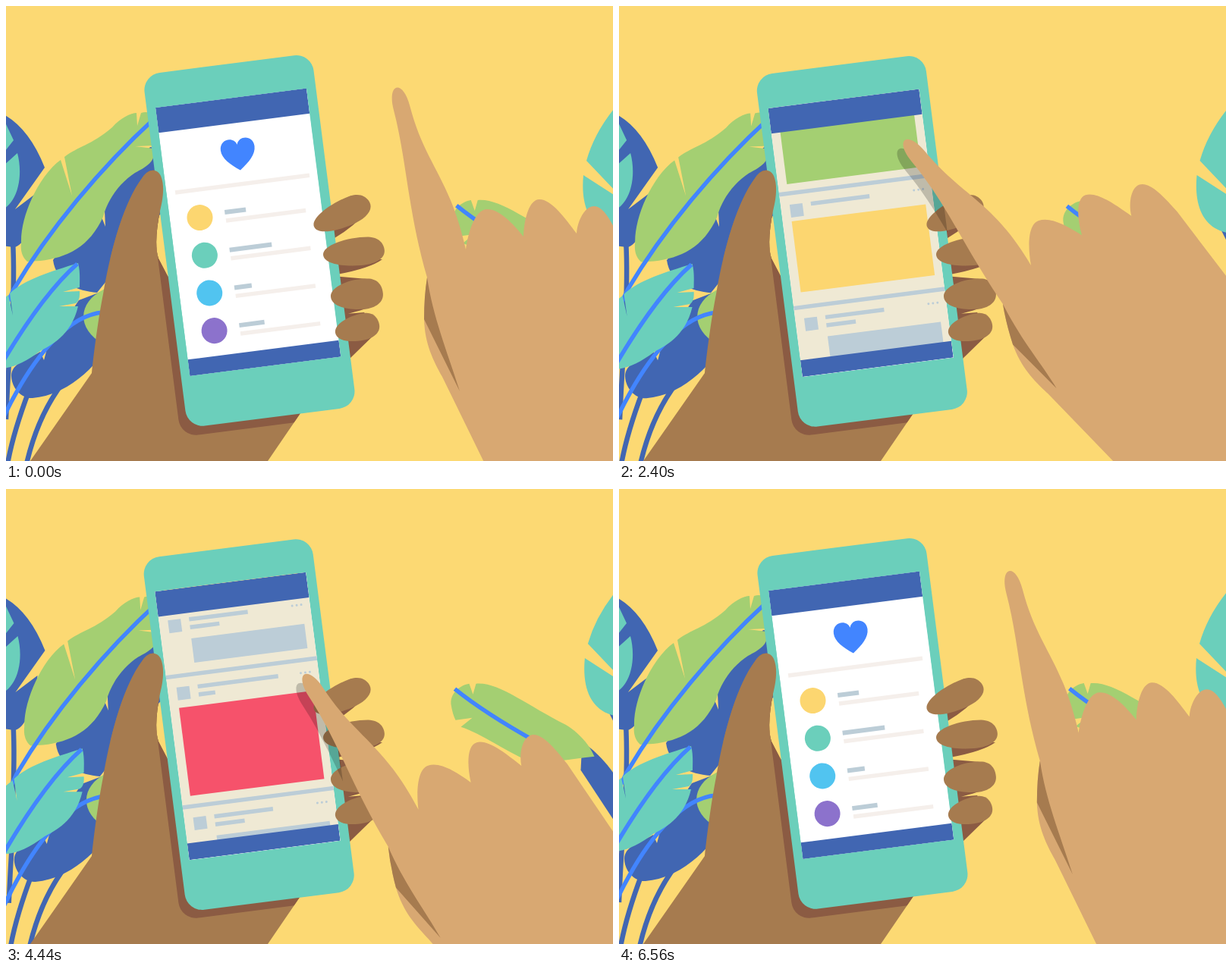
An HTML page that plays this animation: 800 px wide and 600 px high, repeating every 6600 ms.

```html
<!DOCTYPE html>
<html lang="en">
<head>
<meta charset="utf-8">
<title>Scrolling a phone feed</title>
<style>
  html, body { margin: 0; width: 100%; height: 100%; overflow: hidden; background: #fcd973; }
  svg { display: block; width: 100%; height: 100%; }
  .blue { fill: #4166b2; } .teal { fill: #6bcfbb; } .green { fill: #a4cf72; }
  .grey { fill: #bccdd7; } .skin { fill: #a67b4f; } .shade { fill: #8b5b43; }
  .rib, .stem { fill: none; stroke: #4285ff; stroke-width: 5.5; }
  .stem { stroke: #4166b2; stroke-width: 6.5; }
</style>
</head>
<body>
<svg viewBox="0 0 800 600" xmlns="http://www.w3.org/2000/svg">
  <defs>
    <path id="arm" d="M32 600L113 484C116 455 122 410 128 380C140 310 158 255 180 226C188 214 199 214 204 224C210 238 206 258 203 270C198 295 196 318 201 333L213 356L388 537L345 600Z"/>
    <rect id="body" x="-11.7" y="-45" width="224.7" height="469.5" rx="23"/>
    <clipPath id="armClip"><use href="#arm"/></clipPath>
    <clipPath id="thumbClip"><rect y="200" width="230" height="133"/></clipPath>
    <clipPath id="bodyClip"><use href="#body" transform="translate(197 134) rotate(-7.3)"/></clipPath>
    <clipPath id="screenClip"><rect width="200.6" height="357"/></clipPath>
  </defs>
  <rect width="800" height="600" fill="#fcd973"/>

  <g class="sway" data-x="0.5" data-y="0">
    <path class="stem" d="M9 310C11 345 10 380 8 420"/>
    <path class="blue" d="M-5 142Q30 160 51 213L12 268L41 246C39 280 25 318 10 318L-5 316Z"/>
    <path class="teal" d="M-5 145L10 177L-5 196ZM-5 212L15 194C22 220 18 256 -5 269Z"/>
  </g>
  <g class="sway" data-x="4" data-y="1">
    <path class="stem" d="M30 508C18 540 8 570 2 604M74 498C50 530 36 565 27 604M4 470Q2 500 0 545"/>
    <path class="blue" d="M130 375L96 388L80 412L60 430L50 467L45 456C25 468 2 472 8 495C12 510 25 518 35 517C70 514 100 492 122 466L118 404Z"/>
    <path class="green" d="M135 371C97 386 91 420 122 442Z"/>
    <path class="rib" stroke-width="7" d="M128 404C88 407 40 450 -6 548"/>
  </g>
  <g class="sway" data-x="4" data-y="1">
    <path class="blue" d="M190 186L215 190L207 270L120 378C95 376 66 365 62 335L100 280Z"/>
    <path fill="#fcd973" d="M125 276L131 291L130 270Z"/>
  </g>
  <g class="sway" data-x="4.5" data-y="1.7">
    <path class="green" d="M20 312C19 275 45 222 72 203L87 250L77 199C95 185 112 184 140 160C150 148 165 141 172 141L173 158L178 141C187 138 192 142 200 146L196 184L170 185L195 188C198 205 185 212 170 220C150 233 134 255 128 278C110 318 80 332 45 336L28 337C20 330 19 320 20 312Z"/>
    <path class="rib" d="M196 148C124 214 56 296 10 374L-6 408"/>
  </g>
  <g class="sway" data-x="6" data-y="3.5">
    <path class="teal" d="M95 339C98 350 97 362 97 371L75 377L97 376Q98 388 92 392L70 396L95 396C86 435 58 448 45 455C25 470 8 478 -8 478V390L3 381L9 408L5 379C25 360 60 350 95 339Z"/>
    <path class="rib" d="M94 340C60 370 22 424 -10 479"/>
  </g>
  <g class="sway" data-x="-4" data-y="1" data-lag="500">
    <path class="blue" d="M762 332C785 350 795 362 806 378V440L760 370Z"/>
    <path class="green" d="M589 283C588 268 601 258 613 256L618 270L622 256C651 253 690 285 740 310C760 322 772 338 778 352L700 362C660 345 630 322 602 313L617 301L595 304Q591 296 589 283Z"/>
    <path class="rib" d="M594 263C620 284 650 304 700 332"/>
  </g>
  <g class="sway" data-x="2" data-y="0">
    <path class="stem" d="M794 290L808 318"/>
    <path class="teal" d="M806 130Q776 165 765 204L806 247ZM761 223L806 252V300C770 295 757 265 761 223Z"/>
  </g>

  <use href="#arm" class="skin"/>
  <g clip-path="url(#armClip)"><use href="#body" class="shade" transform="translate(188 146) rotate(-7.3)"/></g>
  <path class="shade" d="M420 295L476 270Q460 290 433 306ZM425 335L496 334Q480 346 436 354ZM430 356L476 360L484 395Q470 402 440 408ZM435 407L472 404L491 428L453 465Z"/>

  <g id="phone">
    <use href="#body" class="teal"/>
    <g clip-path="url(#screenClip)">
      <g id="home"><rect width="201" height="357" fill="#fff"/></g>
      <g id="feed">
        <rect width="201" height="357" fill="#efe9d4"/>
        <g id="posts"></g>
        <rect id="veil" width="201" height="357" fill="#efe9d4"/>
        <g id="menu"></g>
      </g>
      <path class="blue" d="M0 0H200.6V33.5H0ZM0 335H200.6V357H0Z"/>
    </g>
  </g>

  <g clip-path="url(#thumbClip)"><use href="#arm" class="skin"/></g>
  <g id="fingers" class="skin"></g>

  <g clip-path="url(#bodyClip)"><path id="shadow"/></g>
  <g id="hand"><path id="palm" fill="#d8a872"/><path id="crease" class="skin"/></g>
</svg>
<script>
const LOOP = 6600;
const $ = id => document.getElementById(id);
const sways = [...document.querySelectorAll('.sway')];
const clamp = v => Math.min(1, Math.max(0, v));

const bar = (x, y, w, h, attrs) => `<rect x="${x}" y="${y - h / 2}" width="${w}" height="${h}" ${attrs}/>`;
const dot = (x, y, r, attrs) => `<circle cx="${x}" cy="${y}" r="${r}" ${attrs}/>`;
const grey = 'class="grey"';

// A holding finger: a teardrop of length l and width w from its tip.
function finger(x, y, angle, l, w) {
  return `<path transform="translate(${x} ${y}) rotate(${angle}) scale(${l} ${w})"
    d="M0 0C0 -.35 .4 -.6 .75 -.55C.95 -.5 1 -.2 1 0C1 .35 .8 .5 .6 .5C.3 .5 0 .35 0 0Z"/>`;
}

function buildHome() {
  const pale = 'fill="#f5efeb"';
  const rows = [['#fcd670', 28], ['#6bcfbb', 56], ['#51c4f0', 23], ['#8c72cc', 33.5]];
  $('home').innerHTML += '<path fill="#4285ff" d="M100.5 96C88 87 78 78 78 67C78 52 97 50 100.500 62C104 50 123 52 123 67C123 78 113 87 100.500 96Z"/>'
    + bar(11.6, 114.4, 178.4, 5.5, pale)
    + rows.map(([color, width], i) => {
      const y = 151.3 + 50.1 * i;
      return dot(39.6, y, 17, `fill="${color}"`) + bar(73, y - 2.8, width, 6, grey) + bar(73.3, y + 8.3, 106, 5.5, pale);
    }).join('');
}

function buildFeed() {
  const posts = [
    { y: 36, lines: [44.5], top: 42.5, h: 16.3 },
    { y: 107.5, pad: 6, lines: [106, 28], top: 43, h: 89, color: '#a4cf72' },
    { y: 258, lines: [78], top: 37, h: 94.3, color: '#fcd670' },
    { y: 409, lines: [78, 39], top: 42.3, h: 32.3 },
    { y: 498.3, lines: [107, 22], top: 42, h: 117, color: '#f6526b' },
    { y: 671, lines: [78, 39], top: 42.3, h: 32.3 }
  ];
  $('posts').innerHTML = posts.map(({ y, pad = 0, lines, top, h, color }, n) => {
    const head = y + pad, left = color ? 12 : 39.7;
    return (n ? bar(0, y, 201, 5.5, grey) : '')
      + bar(12, head + 23.4, 17, 17, grey)
      + lines.map((w, i) => bar(40, head + 17 + 10.6 * i, w, 5.5, grey)).join('')
      + [177, 183, 189].map(x => dot(x, head + 16.7, 1.5, grey)).join('')
      + bar(left, head + top + h / 2, 190 - left, h, color ? `fill="${color}"` : grey);
  }).join('');
}

function buildMenu() {
  let items = '<path fill="#fff" d="M0 145.500H178L183.500 139.500L189 145.500H201V360H0Z"/>';
  for (let y = 167; y < 310; y += 33.6) {
    items += dot(22.8, y, 5.8, 'class="blue"') + bar(44, y, 146, 11.2, 'class="blue"');
  }
  $('menu').innerHTML = items;
}

// Eased progress: gentle start, long settle.
function ease(p) {
  p = clamp(p);
  const curve = (s, a, b) => 3 * (1 - s) * (1 - s) * s * a + 3 * (1 - s) * s * s * b + s * s * s;
  let lo = 0, hi = 1;
  for (let i = 0; i < 18; i++) {
    const mid = (lo + hi) / 2;
    if (curve(mid, 0.33, 0.2) < p) lo = mid; else hi = mid;
  }
  return curve(lo, 0, 1);
}
const ramp = (t, from, to) => ease((t - from) / (to - from));
const swell = (t, from, to) => Math.sin(Math.PI * clamp((t - from) / (to - from)));

function lean(t) {
  const phase = (t + LOOP) % (LOOP / 2) / (LOOP / 4);
  return phase < 1 ? ease(phase) : 1 - ease(phase - 1);
}

// Poses: knuckle position, tilt of the hand, bend of the pointing finger.
const rest = [606, 321, 0, 16];
const tap = [543, 424, 15, 18];
const ready = [587, 353, 10.5, 13];
const swipe = [543, 342, 18, 20];
const touch = [538, 381, 19.8, 10.2];
const raised = [595, 314, 1.5, 23.6];
const curled = [592, 334, 3.3, 32.4];
const gestures = [
  [0, rest], [800, tap], [1520, ready], [2040, tap], [2400, swipe], [3080, touch],
  [3840, raised], [4480, tap], [4960, curled], [5520, tap], [LOOP, rest]
];
const presses = [[760, 840], [2040, 2420], [3080, 3240], [4440, 4520], [5480, 5560]];

const handAt = t => {
  const next = Math.max(1, gestures.findIndex(([time]) => time > t));
  const [t0, from] = gestures[next - 1], [t1, to] = gestures[next];
  const p = (t - t0) / (t1 - t0), s = p * p * (3 - 2 * p);
  return from.map((v, i) => v + (to[i] - v) * s);
};
const contactAt = t => Math.max(...presses.map(([from, to]) => clamp(1 - Math.max(from - t, t - to) / 180)));

function palmPath(bend) {
  const dir = deg => [-Math.sin(deg * Math.PI / 180), -Math.cos(deg * Math.PI / 180)];
  const [bx, by] = dir(bend);
  const [dx, dy] = dir(9 + 1.85 * Math.max(0, bend - 13));
  const at = (side, back) => {
    const x = -25 + 241 * bx - dy * 11 * side - dx * back;
    const y = 18 + 241 * by + dx * 11 * side - dy * back;
    return `${x.toFixed(2)} ${y.toFixed(2)} `;
  };
  return `M-51 37C-77 -53 ${at(-1, 98)}${at(-1, 28)}C${at(-1, -9)}${at(1, -9)}${at(1, 28)}C${at(1, 108)}-22 -97 0 0`
    + 'C3 -22 12 -53 28 -53C45 -53 62 -34 76 -17C77 -42 84 -66 97 -66C113 -66 131 -41 146 -21'
    + 'C147 -38 157 -57 169 -57C184 -57 196 -28 205 -8L241 95L340 280V700H229L-31 168C-43 146 -54 125 -55 92Q-55 62 -51 37Z';
}

function draw(t) {
  for (const { dataset: { x, y, lag = 0 }, ...rest } of []) void rest;
  for (const el of sways) {
    const { x, y, lag = 0 } = el.dataset, amount = lean(t - lag);
    el.setAttribute('transform', `translate(${x * amount} ${y * amount})`);
  }

  const nudge = swell(t, 1560, 3080) + 1.3 * swell(t, 3080, 6500);
  $('phone').setAttribute('transform', `translate(${197 - 0.6 * nudge} ${134 + nudge}) rotate(-7.3)`);

  const scroll = 211.5 * ramp(t, 2047, 2900) + 172.5 * ramp(t, 3280, 4290);
  $('posts').setAttribute('transform', `translate(0 ${-scroll})`);
  $('feed').setAttribute('opacity', ramp(t, 880, 1180) - ramp(t, 5620, 5920));
  const open = ramp(t, 4480, 4860);
  $('veil').setAttribute('opacity', 0.8 * open);
  $('menu').setAttribute('transform', `translate(0 ${200 * (1 - open)})`);

  const [x, y, tilt, bend] = handAt(t);
  const shape = palmPath(bend);
  const fold = Math.max(0, 0.8 * tilt + 2 * (bend - 16));
  const place = (dx, dy) => `translate(${x + dx} ${y + dy}) rotate(${-tilt})`;
  $('palm').setAttribute('d', shape);
  $('crease').setAttribute('d', `M-51 37C-43 90 -26 130 ${-8 - 0.45 * fold} ${187 - fold}L-55 92Q-55 62 -51 37Z`);
  $('hand').setAttribute('transform', place(0, 0));
  $('shadow').setAttribute('d', shape);
  $('shadow').setAttribute('transform', place(-8, 12));
  $('shadow').setAttribute('opacity', 0.2 * contactAt(t));
}

$('fingers').innerHTML = finger(406, 291, -23, 80, 34) + finger(418, 328, -4, 81, 35)
  + finger(428, 383, -3, 69, 38) + finger(434, 431, -11, 59, 33);
buildHome();
buildFeed();
buildMenu();
const start = performance.now();
function tick() {
  draw((performance.now() - start) % LOOP);
  requestAnimationFrame(tick);
}
tick();
</script>
</body>
</html>
```
